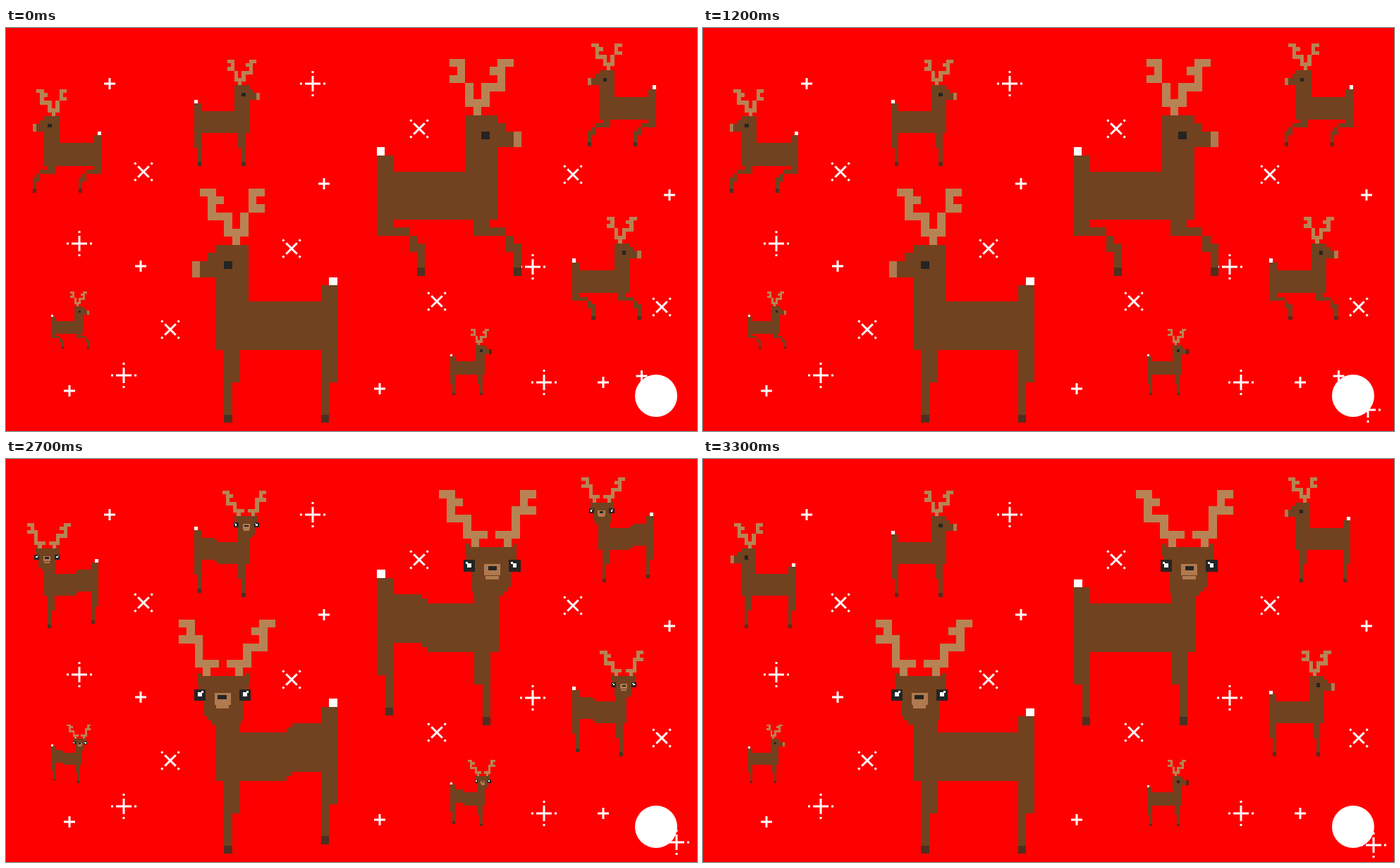
An HTML page with a canvas that plays this animation: 980 px wide and 572 px high, repeating every 3.5 s.

```html
<!DOCTYPE html>
<html lang="en">
<head>
<meta charset="utf-8">
<title>Dancing reindeer</title>
<style>
  html, body { margin: 0; width: 100%; height: 100%; overflow: hidden; background: #f00; }
  canvas { display: block; }
</style>
</head>
<body>
<canvas id="stage" width="980" height="572"></canvas>
<script>
const ctx = document.getElementById('stage').getContext('2d');
const FUR = '#70421f', HORN = '#b88354', HOOF = '#4d3020', DARK = '#242424',
      SNOUT = '#b07a50', WHITE = '#fff';

const SIDE_HORNS = ['AA....AA', '.A...AA.', 'AA....A.', '..A.AAA.', '..A.A...', '..AAA...', '...A....'];
const FRONT_HORNS = ['AA........AA', '.AA.......A.', '.A.......AAA', '.AAA.....A..',
                     '...A.....A..', '...AAA.AAA..', '....A...A...'];

// One flag per animal: faces left, starts standing, is big; then x, y and cell size per pose.
const herd = [
  { left: 1, run: [37.5, 87, 5.44], stand: [38.5, 91, 5.15] },
  { still: 1, run: [267, 42, 5.44], stand: [267, 45, 5.19] },
  { big: 1, run: [526, 44, 11.4], stand: [526, 44, 11.5] },
  { left: 1, run: [825, 22, 5.4], stand: [825, 25.5, 5.16] },
  { run: [803, 267.5, 5.43], stand: [803, 272, 5.16] },
  { run: [64, 374, 3], stand: [64, 376.5, 2.87] },
  { still: 1, nose: '#5c2410', run: [630, 425, 3.4], stand: [630, 427, 3.25] },
  { left: 1, still: 1, big: 1, run: [263.5, 228, 11.4], stand: [263.5, 227.5, 11.47] }
];

const smallStars = [[147, 79], [451, 221], [191, 338], [90, 515], [530, 512], [847, 503], [941, 237]];
const plusFirst = [[435, 79], [104, 306], [167, 493], [763, 503], [747, 339]];
const crossFirst = [[195, 204], [405, 313], [233, 428], [586, 143], [804, 208], [611, 388], [930, 396]];

// Stars beside the disc, by step: s = small, x = cross, p = plus.
const upperStar = 'sxp.sp....sp...';
const lowerStar = '...xp.sxp...sxp';
const lowerSpots = { 3: [943, 542], 4: [943, 542], 6: [942, 550], 7: [947, 546],
                     8: [951, 544], 12: [942, 550], 13: [951, 548], 14: [951, 548] };

function star(kind, [x, y]) {
  ctx.save();
  ctx.translate(x, y);
  ctx.fillStyle = WHITE;
  if (kind === 'x') ctx.rotate(Math.PI / 4);
  const arm = kind === 's' ? 8 : 11;
  ctx.fillRect(-arm, -1.5, arm * 2, 3);
  ctx.fillRect(-1.5, -arm, 3, arm * 2);
  if (kind !== 's') {
    for (const d of [-18, 15]) {
      ctx.fillRect(d, -1.5, 3, 3);
      ctx.fillRect(-1.5, d, 3, 3);
    }
  }
  ctx.restore();
}

// Returns a painter for cells of one animal, mirrored when it faces left.
function painter([ox, oy, u], left) {
  return (color, x, y, w, h) => {
    const col = left ? 18 - x - w : x;
    const x0 = Math.round(ox + col * u), x1 = Math.round(ox + (col + w) * u);
    const y0 = Math.round(oy + y * u), y1 = Math.round(oy + (y + h) * u);
    ctx.fillStyle = color;
    ctx.fillRect(x0, y0, x1 - x0, y1 - y0);
  };
}

function horns(box, rows, x) {
  rows.forEach((row, y) => [...row].forEach((c, i) => {
    if (c === 'A') box(HORN, x + i, y, 1, 1);
  }));
}

function sideHead(box, nose = SNOUT) {
  horns(box, SIDE_HORNS, 9);
  box(FUR, 11, 7, 4, 7);
  box(FUR, 15, 8, 1, 3);
  box(FUR, 16, 9, 1, 2);
  box(nose, 17, 9, 1, 2);
  box(DARK, 13, 9, 1, 1);
}

function frontHead(box) {
  horns(box, FRONT_HORNS, 7.65);
  for (const x of [10.9, 16.75]) box(FUR, x, 6.65, .5, 1.4);
  box(FUR, 11, 7, 6.2, 1.8);
  box(FUR, 11.7, 7, 4.8, 5);
  box(FUR, 11.7, 12, 4.4, .5);
  box(FUR, 11.9, 12.5, 3.7, .5);
  box(FUR, 12, 13, 3, 1);
  for (const x of [10.7, 16.3]) {
    box(DARK, x, 8.65, 1.4, 1.4);
    box(WHITE, x + .45, 9.05, .5, .5);
    box(WHITE, x + .25, 8.85, .25, .25);
  }
  box(SNOUT, 13.2, 9.15, 2, 1.4);
  box(DARK, 13.7, 9.4, 1.1, .5);
  box(SNOUT, 13.4, 10.6, 1.6, .4);
}

function tail(box, lift) {
  box(WHITE, 0, 11 - lift, 1, 1);
  box(FUR, 0, 12 - lift, 2, 2);
}

function body(box, lift) {
  box(FUR, 0, 14 - lift, 5.6, 6);
  box(FUR, 5.6, 14 - lift / 2, .7, 6);
  box(FUR, 6.3, 14, 8.7, 6);
}

function straightLeg(box, top, low, lift) {
  box(FUR, top, 20 - lift, 2, 4);
  box(FUR, low, 24 - lift, 1, 4);
  box(HOOF, low, 28 - lift, 1, 1);
}

function bentLeg(box, x) {
  box(FUR, x, 20, 2, 1);
  box(FUR, x, 21, 4, 1);
  box(FUR, x + 4, 22, 1, 2);
  box(FUR, x + 5, 23, 1, 3);
  box(HOOF, x + 5, 26, 1, 1);
}

function deer(d, pose, lift) {
  const running = pose === 'run';
  const box = painter(running ? d.run : d.stand, d.left);
  tail(box, lift);
  body(box, lift);
  if (running) {
    bentLeg(box, 0);
    bentLeg(box, 12);
  } else {
    straightLeg(box, 0, 1, lift);
    straightLeg(box, 12, 13, 0);
  }
  if (pose === 'front') frontHead(box);
  else sideHead(box, d.nose);
}

function poseAt(d, step) {
  if (step < 5) return (step + (d.still || 0)) % 2 ? 'stand' : 'run';
  if (step === 5 || step === 14) return d.big ? 'front' : 'stand';
  return 'front';
}

// Five slow steps, one long hold, then quick ones with a longer last step.
function stepAt(t) {
  return t < 2500 ? Math.min(Math.floor(t / 300), 5)
                  : Math.min(6 + Math.floor((t - 2500) / 100), 14);
}

function draw(step) {
  const odd = step % 2;
  ctx.fillStyle = '#f00';
  ctx.fillRect(0, 0, 980, 572);

  smallStars.forEach(p => star('s', p));
  plusFirst.forEach(p => star(odd ? 'x' : 'p', p));
  crossFirst.forEach(p => star(odd ? 'p' : 'x', p));
  if (upperStar[step] !== '.') star(upperStar[step], [901.5, 494]);
  if (lowerStar[step] !== '.') star(lowerStar[step], lowerSpots[step]);

  const lift = step > 5 && step < 14 && !odd ? 1.15 : 0;
  herd.forEach(d => deer(d, poseAt(d, step), lift));

  ctx.fillStyle = WHITE;
  ctx.beginPath();
  ctx.arc(922, 522, 30, 0, Math.PI * 2);
  ctx.fill();
}

function tick() {
  draw(stepAt(performance.now() % 3500));
  requestAnimationFrame(tick);
}
tick();
</script>
</body>
</html>
```
